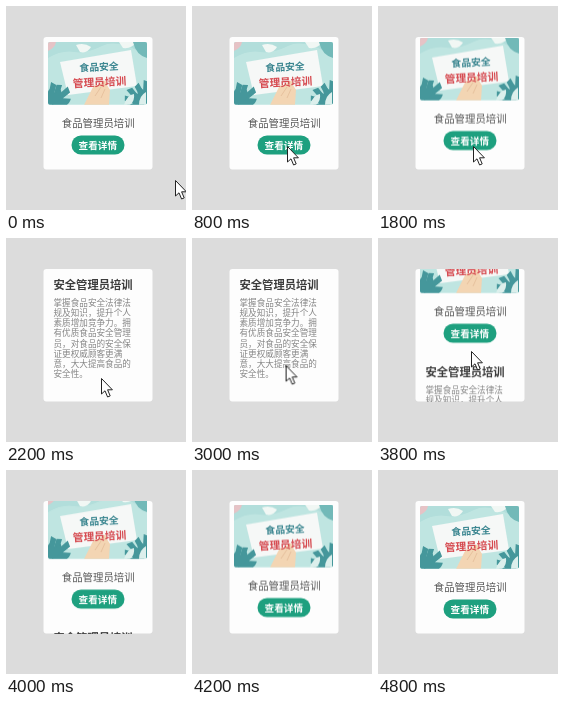
These frames come from a looping animation (180x204 px, 5300 ms). An HTML page:

```html
<!DOCTYPE html>
<html lang="zh-CN">
<head>
<meta charset="utf-8">
<title>Sliding card</title>
<style>
  html, body { margin: 0; width: 100%; height: 100%; overflow: hidden; background: #dcdcdc; }
  svg { display: block; width: 180px; height: 204px; font-family: "Noto Sans CJK SC", "Noto Sans CJK", sans-serif; }
  .mid { text-anchor: middle; }
  .bold { font-weight: 700; }
  .track { animation: slide 5300ms linear infinite; }
  .cursor { animation: point 5300ms linear infinite; }

  /* Slides by one card height, eased both ways */
  @keyframes slide {
    0%, 33.02% { transform: translateY(0); }
    33.96% { transform: translateY(-4px); }
    35.85% { transform: translateY(-48px); }
    37.74% { transform: translateY(-92px); }
    39.62% { transform: translateY(-120px); }
    41.51%, 66.98% { transform: translateY(-131px); }
    67.92% { transform: translateY(-126px); }
    69.81% { transform: translateY(-82px); }
    71.7% { transform: translateY(-44px); }
    73.58% { transform: translateY(-22px); }
    75.47% { transform: translateY(-10px); }
    77.36% { transform: translateY(-4px); }
    79.25% { transform: translateY(-1.5px); }
    81.13%, 100% { transform: translateY(0); }
  }
  @keyframes point {
    0%, 1% { transform: translate(169px, 174px); animation-timing-function: ease-in-out; }
    11.3%, 53.8% { transform: translate(95px, 140px); }
    55.66% { transform: translate(97px, 133px); }
    58.49% { transform: translate(87px, 116px); }
    60.38%, 69.81% { transform: translate(93px, 110px); }
    71.7% { transform: translate(93px, 113px); opacity: 1; }
    73.5% { transform: translate(93px, 113px); opacity: 1; }
    73.51%, 100% { transform: translate(93px, 113px); opacity: 0; }
  }
</style>
</head>
<body>
<svg viewBox="0 0 180 204">
  <defs>
    <clipPath id="card"><rect x="37.5" y="31" width="109" height="132.5" rx="3"/></clipPath>
    <clipPath id="picture"><rect x="42" y="36" width="99" height="62.7" rx="2"/></clipPath>
    <path id="leaf" d="M0 0C-9-1-12-8-10-13L-5-9-8-17-4-20-1-12 1-22 6-19 4-11 10-15C13-9 9-1 0 0Z"/>
  </defs>

  <g clip-path="url(#card)">
    <rect x="37" y="31" width="110" height="133" fill="#fdfdfd"/>
    <g class="track">
      <g clip-path="url(#picture)">
        <rect x="42" y="36" width="99" height="63" fill="#bfe5e1"/>
        <path d="M42 52Q56 44 68 46T96 40 141 50V36H42Z" fill="#b2dedb"/>
        <path d="M42 36H50Q49 42 42 45Z" fill="#e6c3c6"/>
        <path d="M70 39Q78 36 85 41 81 48 74 46ZM113 36H130Q126 43 117 42Z" fill="#f1f7f4"/>
        <path d="M127 36H141V52Q130 49 127 36Z" fill="#72b9b8"/>
        <path d="M54 56 125 44 131 80 62 89Z" fill="#f6f8f7"/>
        <g fill="#45979b">
          <use href="#leaf" transform="translate(46 99) rotate(38) scale(1.1)"/>
          <use href="#leaf" transform="translate(44 99) scale(1.05)"/>
          <use href="#leaf" transform="translate(138 99) rotate(-52) scale(1.05)"/>
          <use href="#leaf" transform="translate(140 98) rotate(-8) scale(1.1)"/>
        </g>
        <path d="M118 99Q121 89 128 88 129 95 124 99ZM133 99Q133 90 140 86V99Z" fill="#dcefec"/>
        <path d="M78 99 86 83Q89 77 92 80L97 75Q101 74 101 79L104 84 103 99Z" fill="#f3d5b3"/>
        <path d="M89 90 95 81M95 92 99 83" stroke="#e4bd98" stroke-width=".8"/>
        <g class="mid bold">
          <text x="93" y="64.5" font-size="9.8" fill="#39858f" transform="rotate(-3 93 61)">食品安全</text>
          <text x="93.5" y="80" font-size="10.7" fill="#d64a50" transform="rotate(-3 93.5 76)">管理员培训</text>
        </g>
      </g>
      <text class="mid" x="92.2" y="120.5" font-size="10.4" fill="#555">食品管理员培训</text>
      <rect x="65.5" y="129.5" width="53" height="19" rx="9.5" fill="#1ea07f"/>
      <text class="mid bold" x="91.8" y="142.6" font-size="9.6" fill="#fff">查看详情</text>

      <g transform="translate(0 131)">
        <text class="bold" x="47.5" y="51" font-size="11.3" fill="#3c3c3c">安全管理员培训</text>
        <text font-size="8.6" fill="#858585">
          <tspan x="47.5" y="67.5">掌握食品安全法律法</tspan>
          <tspan x="47.5" dy="10.25">规及知识，提升个人</tspan>
          <tspan x="47.5" dy="10.25">素质增加竞争力。拥</tspan>
          <tspan x="47.5" dy="10.25">有优质食品安全管理</tspan>
          <tspan x="47.5" dy="10.25">员，对食品的安全保</tspan>
          <tspan x="47.5" dy="10.25">证更权威顾客更满</tspan>
          <tspan x="47.5" dy="10.25">意，大大提高食品的</tspan>
          <tspan x="47.5" dy="10.25">安全性。</tspan>
        </text>
      </g>
    </g>
  </g>

  <path class="cursor" d="M.5.5V16L4 12.8 6.6 19 9.2 17.9 6.6 11.8H11.4Z" fill="#fff" stroke="#222" stroke-linejoin="round"/>
</svg>
</body>
</html>
```
